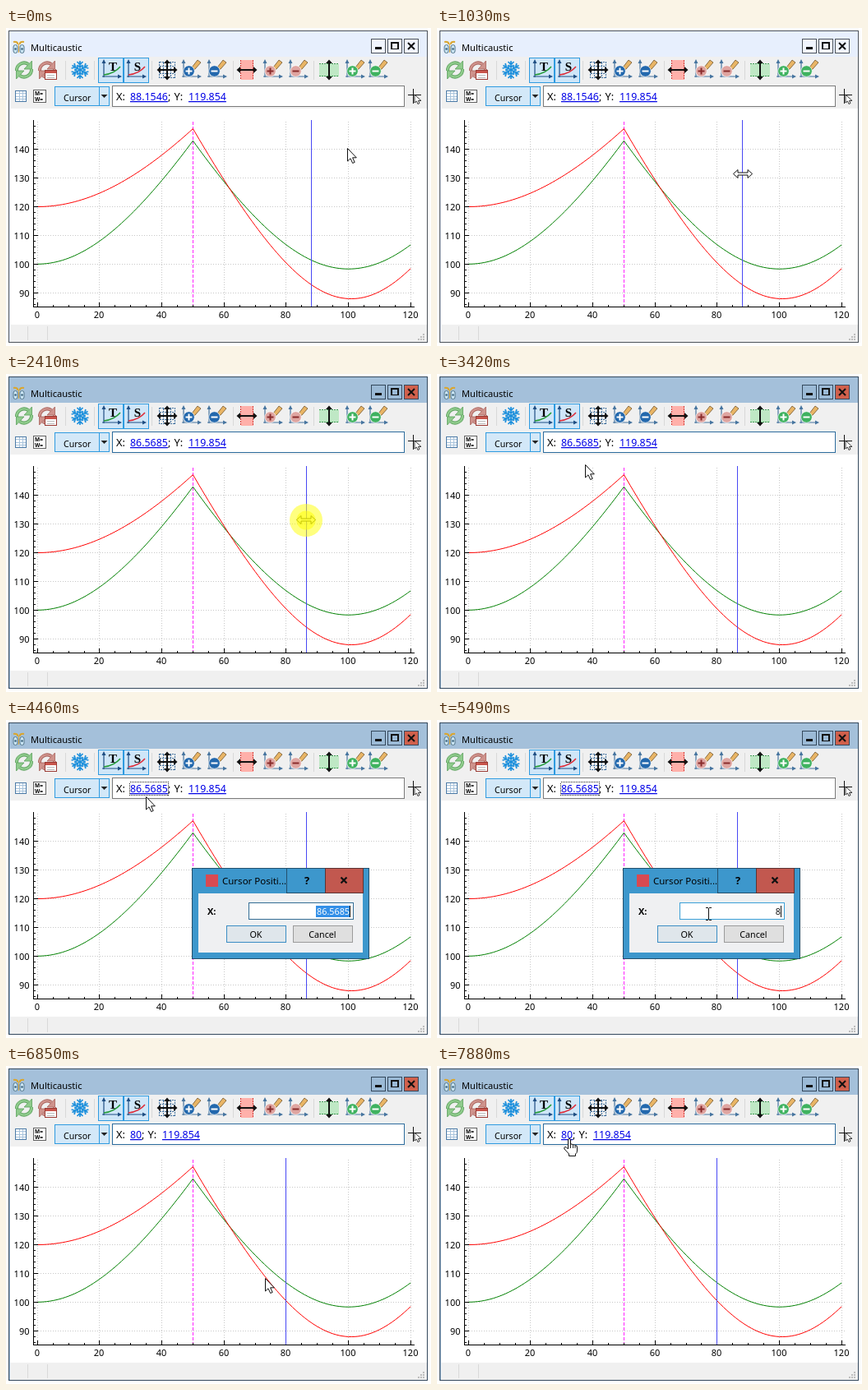
An HTML page for the animation above (9380 ms loop, 517 by 387 pixels).

```html
<!DOCTYPE html>
<html lang="en">
<head>
<meta charset="utf-8">
<title>Multicaustic</title>
<style>
html, body { margin: 0; width: 100%; height: 100%; overflow: hidden; background: #fff; }
svg { display: block; width: 517px; height: 387px; }
text { font-family: "Noto Sans", "Open Sans", sans-serif; white-space: pre; }
.crisp { shape-rendering: crispEdges; }
</style>
</head>
<body>
<svg id="stage" viewBox="0 0 517 387" xmlns="http://www.w3.org/2000/svg"></svg>
<script>
const LOOP = 9380;
const START = performance.now();

// ---- markup helpers ----
const rect = (x, y, w, h, fill, extra = '') =>
  `<rect x="${x}" y="${y}" width="${w}" height="${h}" fill="${fill}" ${extra}/>`;
const box = (x, y, w, h, fill, stroke, extra = '') =>
  rect(x + .5, y + .5, w - 1, h - 1, fill, `stroke="${stroke}" class="crisp" ${extra}`);
const line = (d, stroke, width = 1, extra = '') =>
  `<path d="${d}" fill="none" stroke="${stroke}" stroke-width="${width}" ${extra}/>`;
const crisp = (d, stroke, extra = '') => line(d, stroke, 1, `class="crisp" ${extra}`);
const fill = (d, color, extra = '') => `<path d="${d}" fill="${color}" ${extra}/>`;
const disc = (x, y, r, color, extra = '') => `<circle cx="${x}" cy="${y}" r="${r}" fill="${color}" ${extra}/>`;
const text = (x, y, size, s, extra = '') => `<text x="${x}" y="${y}" font-size="${size}" ${extra}>${s}</text>`;
const at = (x, y, body, extra = '') => `<g transform="translate(${x} ${y})" ${extra}>${body}</g>`;
const spin = (a, body) => `<g transform="rotate(${a})">${body}</g>`;

// ---- plot ----
const px = x => 38.3 + 3.7825 * x;
const py = y => 217.5 - 3.49 * (y - 120);
const snap = n => Math.floor(n) + .5;

// Hyperbolic beam profile on each side of the lens at x = 50.
function curve(w0, peak, waist, z0) {
  const left = (peak ** 2 - w0 ** 2) / 50 ** 2;
  const right = (peak ** 2 - waist ** 2) / (z0 - 50) ** 2;
  let d = '';
  for (let x = 0; x <= 120; x++) {
    const w = x <= 50 ? Math.sqrt(w0 ** 2 + left * x * x)
                      : Math.sqrt(waist ** 2 + right * (x - z0) ** 2);
    d += `${x ? 'L' : 'M'}${px(x).toFixed(2)} ${py(w).toFixed(2)}`;
  }
  return d;
}

function plot() {
  let grid = '', ticks = 'M33.5 112V340M33 339.5H497', labels = '';
  for (let x = 0; x <= 120; x += 5) {
    const p = snap(px(x)), major = x % 20 === 0;
    ticks += `M${p} 340V${major ? 334 : 337}`;
    if (major) {
      grid += `M${p} 340V112`;
      labels += text(p - .5, 353, 11, x, 'text-anchor="middle"');
    }
  }
  for (let y = 86; y <= 148; y += 2) {
    const p = snap(py(y)), major = y % 10 === 0;
    ticks += `M33 ${p}H${major ? 39 : 36}`;
    if (major) {
      grid += `M33 ${p}H497`;
      labels += text(28.5, p + 4, 11, y, 'text-anchor="end"');
    }
  }
  return rect(5, 98, 507, 263, '#fff') +
    crisp(grid, '#c8c8c8', 'stroke-dasharray="1 2"') +
    crisp('M227.5 340V112', '#ff24ff', 'stroke-dasharray="4 2"') +
    line(curve(100, 143, 98.3, 100), '#008000') +
    line(curve(120, 147.2, 87.9, 100.9), '#f00') +
    crisp(ticks, '#000') + labels;
}

// ---- toolbar icons, drawn around 0,0 ----
const refresh = (dark, light) => [0, 180].map(a => spin(a,
  line('M-9 1A9 9 0 0 1 5 -7', dark, 4) + line('M-9 1A9 9 0 0 1 5 -7', light, 2.4) +
  fill('M9.5 -11V-1H0Z', light, `stroke="${dark}" stroke-width=".8"`))).join('');

const redrawTable = () => refresh('#a8605a', '#cf938c') +
  box(-3, 0, 15, 12, '#fff', '#9a3a34') + rect(-2, 1, 13, 3, '#c9564d') +
  crisp('M0 6.5H9M0 9.5H9', '#b9b9b9');

const flake = () => [0, 60, 120, 180, 240, 300].map(a => spin(a,
  line('M0 0V-11M-3.5 -10L0 -6.5L3.5 -10M-3 -6L0 -3L3 -6', '#1e90dc', 1.7))).join('');

const axes = color =>
  line('M-9 -11V9M-11 8H11', color, 1.2) +
  fill('M-11.5 -8L-9 -13L-6.5 -8ZM8 5.5L13 8L8 10.5Z', color);

const graph = (letter, color) =>
  axes('#1f4e83') + line('M-9 6C0 5 6 2 11 -4', color, 1.5) +
  text(2, 1, 15, letter, 'text-anchor="middle" font-weight="bold" style="font-family:Liberation Serif,serif"');

const zoom = ([color, sign], plus) =>
  axes('#46749f') +
  fill('M1 -3L8 -12L12 -9L5 -1L0 1Z', '#e9b565', 'stroke="#71552d" stroke-width=".8"') +
  disc(-2.5, 1.5, 6.8, color, 'stroke="#fff" stroke-width=".7"') +
  line('M-6.5 1.5H1.5' + (plus ? 'M-2.5 -2.5V5.5' : ''), sign, 2);

const arrows = angles => angles.map(a => spin(a, fill('M0 -12.5L-4 -8H-1V-4H1V-8H4Z', '#111'))).join('');

const fitAll = () => crisp('M-9.5 -9.5H9.5V9.5H-9.5ZM-9 -4.5H9M-9 4.5H9M-4.5 -9V9M4.5 -9V9', '#3e6f9e', 'stroke-dasharray="2 1"') +
  line('M-9 0H9M0 -9V9', '#111', 2) + arrows([0, 90, 180, 270]);
const fitX = () => rect(-7, -12, 15, 24, '#ffb0aa') +
  crisp('M-7.5 -12V12M7.5 -12V12', '#d53a36', 'stroke-dasharray="2 1"') +
  line('M-9 0H9', '#111', 2) + arrows([90, 270]);
const fitY = () => rect(-12, -7, 24, 15, '#bfe8c5') +
  crisp('M-12 -7.5H12M-12 7.5H12', '#3d9b52', 'stroke-dasharray="2 1"') +
  line('M0 -9V9', '#111', 2) + arrows([0, 180]);

function toolbar() {
  const checked = x => box(x, 36, 31, 31, '#cfe6f8', '#2f9be0');
  const seps = [72, 107, 177, 276, 374].map(x => crisp(`M${x}.5 40V63`, '#d8d8d8')).join('');
  const blue = ['#2368ad', '#fff'], rose = ['#dfa5a1', '#8a2c2c'], green = ['#3fb260', '#fff'];
  const row = [
    [22, refresh('#5ba15c', '#8fcb8c')], [50, redrawTable()], [90, flake()],
    [128, graph('T', '#219a35')], [158, graph('S', '#df2936')],
    [196, fitAll()], [225, zoom(blue, true)], [256, zoom(blue, false)],
    [293, fitX()], [324, zoom(rose, true)], [355, zoom(rose, false)],
    [393, fitY()], [424, zoom(green, true)], [452, zoom(green, false)]
  ];
  return rect(5, 35, 507, 63, '#f0f0f0') + seps + checked(112) + checked(143) +
    row.map(([x, body]) => at(x, 51, body)).join('') +
    box(11, 76, 14, 14, '#fff', '#4c7ba7') +
    crisp('M12 79.5H24M12 83.5H24M12 86.5H24M16.5 77V89M20.5 77V89', '#a9c4dc') +
    box(33, 75, 16, 16, '#fff', '#606060') +
    text(35, 82.3, 6.5, 'M=', 'font-weight="bold"') + text(35, 89.3, 6.5, 'W=', 'font-weight="bold"') +
    box(59, 71, 67, 24, '#d3e8f8', '#2f9be0') + crisp('M113.5 72V94', '#2f9be0') +
    text(70, 88.5, 10.6, 'Cursor') + fill('M115.5 81H123.5L119.5 85Z', '#222') +
    crisp('M489 81.5H505M495.5 74V92', '#111') +
    at(497, 81, fill('M0 0V10L2.5 8L4 11.5L6 10.5L4.5 7.5H8Z', '#fff', 'stroke="#222" stroke-width=".9"'));
}

function titleIcon() {
  const eye = x => rect(x, 20.5, 5, 10, '#c9e4f3', 'rx="2.5" stroke="#58798c"') +
    disc(x + 2.5, 25.5, 1.2, '#355d78');
  return line('M9 17Q14 16 14.5 20M22 17Q17 16 16.5 20', '#dba62e', 2) + eye(9) + eye(17) +
    line('M15.5 20V30', '#d9a637', 1);
}

function statusBar() {
  let grip = '';
  for (let i = 0; i < 3; i++)
    for (let j = 0; j <= i; j++) grip += rect(507 - 3 * j, 372 + 3 * i, 2, 2, '#bdbdbd');
  return rect(5, 361, 507, 21, '#f0f0f0') + crisp('M26.5 363V380M50.5 363V380', '#d9d9d9') + grip;
}

function dialog() {
  return box(226, 180, 216, 111, '#3d97cc', '#24506d') +
    rect(243, 188, 15, 15, '#d84a52') +
    text(263, 200, 11.5, 'Cursor Positi...') +
    box(341, 180, 48, 31, '#3d97cc', '#24506d') +
    box(388, 180, 47, 31, '#c2584f', '#5c3334') +
    text(366, 200, 13, '?', 'text-anchor="middle" font-weight="bold"') +
    line('M407.5 191.5L414.5 198.5M414.5 191.5L407.5 198.5', '#111', 2.2) +
    rect(234, 211, 200, 72, '#eff0f2') +
    text(245, 237, 11, 'X:', 'font-weight="bold"') +
    `<rect id="entry" class="crisp" x="295.5" y="222.5" width="127" height="20" fill="#fff"/>` +
    `<rect id="select" class="crisp" x="377" y="226" width="42" height="14" fill="#3390e8"/>` +
    text(418, 236.7, 10.8, '', 'id="typed" text-anchor="end"') +
    `<path id="caret" class="crisp" d="M418.5 226V240" stroke="#111"/>` +
    `<rect id="ok" class="crisp" x="268.5" y="250.5" width="72" height="20" stroke="#3b8dc4"/>` +
    text(304, 265, 10.8, 'OK', 'text-anchor="middle"') +
    box(349, 250, 73, 21, '#dfdfdf', '#9b9b9b') +
    text(385, 265, 10.7, 'Cancel', 'text-anchor="middle"');
}

// ---- pointers, drawn from their top left corner ----
const ink = 'stroke="#111" stroke-width="1" stroke-linejoin="round"';
const pointers = {
  arrow: fill('M.5 .5V16L4 12.8L6.7 18.5L9.2 17.4L6.6 11.8H11.3Z', '#fff', ink),
  resize: fill('M.5 5.5L6 .5V4H18V.5L23.5 5.5L18 10.5V7H6V10.5Z', '#fff', ink),
  hand: fill('M5.5 12V2Q5.5 .5 7 .5Q8.5 .5 8.5 2V7.5Q10 6 11.3 8Q13 6.8 14 8.8Q16.5 8 16.5 11V15Q16.5 18 14.5 19V21.5H6.5V19L1 13Q0 11 2 10.5Q3.5 10.5 5.5 13Z', '#fff', ink) +
    line('M8.5 7V12M11.5 8V12M14 9V12', '#111', .9),
  beam: crisp('M0 .5H3M4 .5H7M3.5 1V15M0 15.5H3M4 15.5H7', '#111')
};

const stage = document.getElementById('stage');
stage.innerHTML =
  rect(0, 0, 517, 387, '#fff') +
  `<rect id="frame" class="crisp" x="3.5" y="3.5" width="509" height="379"/>` +
  titleIcon() + text(30, 28, 11.1, 'Multicaustic') +
  `<path id="buttons" class="crisp" d="M444.5 13.5h17v17h-17zM464.5 13.5h17v17h-17z"/>` +
  `<path id="close" class="crisp" d="M484.5 13.5h17v17h-17z"/>` +
  rect(449, 23, 8, 3, '#111', 'class="crisp"') +
  crisp('M468.5 18.5H477.5V25.5H468.5ZM468 17.5H478M469.5 18V26M476.5 18V26', '#111') +
  line('M489 18L497 26M497 18L489 26', '#111', 2) +
  toolbar() +
  `<rect id="field" class="crisp" x="129.5" y="70.5" width="355" height="25" fill="#fff"/>` +
  text(134, 88, 12.8, 'X:') +
  `<g fill="#0000e6" text-decoration="underline">${text(151, 88, 12.4, '', 'id="xval"')}</g>` +
  `<g id="rest">${text(0, 88, 12.4, ';') + text(7.5, 88, 12.8, 'Y:') +
    text(25, 88, 12.4, '119.854', 'fill="#0000e6" text-decoration="underline"')}</g>` +
  crisp('M150.5 75.5H197.5V91.5H150.5Z', '#222', 'id="focus" stroke-dasharray="1 1"') +
  plot() +
  `<path id="marker" class="crisp" d="M.5 112V339" stroke="#4848f4"/>` +
  statusBar() +
  `<g id="dialog">${dialog()}</g>` +
  Object.entries(pointers).map(([k, body]) => `<g id="${k}">${body}</g>`).join('') +
  `<g id="glow" fill-opacity=".5">${disc(0, 0, 20, '#ff0') + disc(0, 0, 11.5, '#ff0')}</g>`;

const el = Object.fromEntries([...stage.querySelectorAll('[id]')].map(n => [n.id, n]));
const set = (id, attrs) => { for (const k in attrs) el[id].setAttribute(k, attrs[k]); };
const show = (id, on) => set(id, { visibility: on ? 'visible' : 'hidden' });

// Each step changes only the listed parts of the state.
const steps = [
  [0, { kind: 'arrow', x: 415, y: 146, value: '88.1546', entry: '86.5685' }],
  [350, { x: 406, y: 155 }],
  [700, { x: 378, y: 173 }],
  [1030, { kind: 'resize', x: 360, y: 172 }],
  [1380, { x: 363, value: '89.2121', active: true, field: true, glow: [375, 178, 1] }],
  [1710, { x: 367, value: '90.2696', glow: [379, 178, 1] }],
  [2060, { x: 354, value: '86.8329', glow: [366, 178, 1] }],
  [2410, { x: 353, value: '86.5685', glow: [365, 178, 1] }],
  [2740, { glow: null }],
  [3090, { kind: 'arrow', x: 284, y: 155 }],
  [3420, { x: 180, y: 110 }],
  [3770, { kind: 'hand', x: 158, y: 84 }],
  [4120, { x: 164, y: 93, focus: true, glow: [172, 103, .8] }],
  [4460, { kind: 'arrow', x: 170, y: 93, field: false, glow: null, dialog: true, select: true, caret: true }],
  [4790, { x: 311, y: 206, caret: false }],
  [5140, { kind: 'beam', x: 327, y: 228, caret: true, hover: true }],
  [5490, { entry: '8', select: false }],
  [5840, { entry: '80' }],
  [6170, { kind: 'arrow', x: 315, y: 258, hover: false, caret: false, okHot: true }],
  [6500, { glow: [321, 267.5, .8] }],
  [6850, { glow: null, dialog: false, focus: false, field: true, value: '80' }],
  [7200, { x: 237, y: 188 }],
  [7530, { x: 171, y: 100 }],
  [7880, { kind: 'hand', x: 154, y: 88 }]
];

function draw(t) {
  const s = {};
  for (const [from, change] of steps) if (from <= t) Object.assign(s, change);

  const edge = s.active ? '#34485c' : '#4c5259';
  set('frame', { fill: s.active ? '#a4c0da' : '#e7effd', stroke: edge });
  set('buttons', { fill: s.active ? '#9bbad6' : '#f1f5fe', stroke: edge });
  set('close', { fill: s.active ? '#d0604c' : '#f1f5fe', stroke: edge });
  set('field', { stroke: s.field ? '#2d6c9d' : '#7a7a7a' });
  el.xval.textContent = s.value;
  set('rest', { transform: `translate(${s.value.length > 2 ? 197 : 165} 0)` });
  show('focus', s.focus);
  set('marker', { transform: `translate(${Math.floor(px(+s.value))} 0)` });

  show('dialog', s.dialog);
  el.typed.textContent = s.entry;
  set('typed', { fill: s.select ? '#fff' : '#111' });
  set('entry', { stroke: s.hover ? '#3ba0d8' : '#336d95' });
  set('ok', { fill: s.okHot ? '#bfe5fb' : '#dfe6eb' });
  show('select', s.dialog && s.select);
  show('caret', s.dialog && s.caret);

  for (const k in pointers) show(k, k === s.kind);
  set(s.kind, { transform: `translate(${s.x} ${s.y})` });
  show('glow', s.glow);
  if (s.glow) {
    const [x, y, size] = s.glow;
    set('glow', { transform: `translate(${x} ${y}) scale(${size})` });
  }
}

function tick() {
  draw((performance.now() - START) % LOOP);
  requestAnimationFrame(tick);
}
tick();
</script>
</body>
</html>
```
